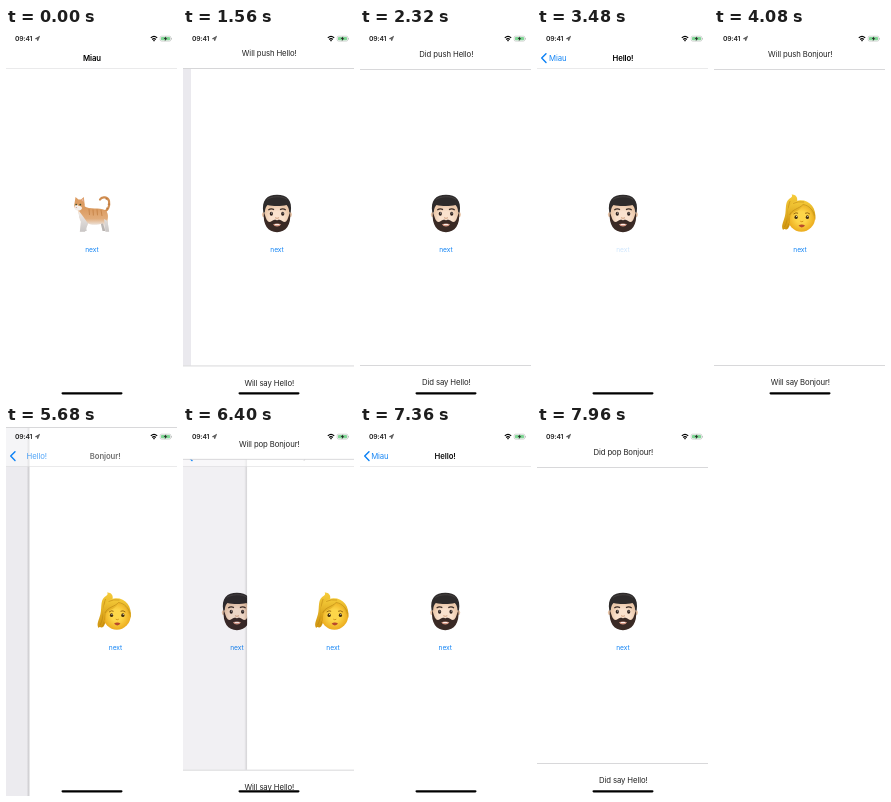
Write an HTML page that moves like this. It is 171 px wide and 370 px high and loops after 8 s.

```html
<!DOCTYPE html>
<html lang="en">
<head>
<meta charset="utf-8">
<title>Navigation events</title>
<style>
  html, body { margin: 0; width: 100%; height: 100%; overflow: hidden; background: #fff; }
  svg { display: block; width: 100%; height: 100%; }
  text { font: 400 7.75px Inter, "Liberation Sans", sans-serif; letter-spacing: -.013em; fill: #222; }
  .mid { text-anchor: middle; }
  .title { font-weight: 600; fill: #000; }
  .blue { fill: #1485f5; }
  .next { font-size: 6.7px; }
  .clock { font-size: 6.75px; font-weight: 600; letter-spacing: -.025em; }
</style>
</head>
<body>
<svg viewBox="0 0 171 370" preserveAspectRatio="none">
  <defs>
    <linearGradient id="edge"><stop offset="0" stop-opacity="0"/><stop offset="1" stop-opacity=".2"/></linearGradient>
    <linearGradient id="fur" x2="0" y2="1"><stop offset="0" stop-color="#d9975a"/><stop offset=".5" stop-color="#e2ac7a"/><stop offset=".75" stop-color="#ece4de"/></linearGradient>
    <linearGradient id="leg" x2="0" y2="1"><stop offset="0" stop-color="#f1ece8"/><stop offset="1" stop-color="#c9c6c5"/></linearGradient>
    <radialGradient id="skin"><stop offset=".5" stop-color="#fae2ce"/><stop offset="1" stop-color="#ecc9ab"/></radialGradient>
    <radialGradient id="gold"><stop offset=".4" stop-color="#fdd649"/><stop offset="1" stop-color="#ecac1e"/></radialGradient>
    <linearGradient id="hair" x2="0" y2="1"><stop offset="0" stop-color="#f6cc3a"/><stop offset="1" stop-color="#cf9410"/></linearGradient>

    <g id="cat">
      <path d="M97 184C102 183 104 178 103 173C102 169 96 168 94 171.500" fill="none" stroke="#d08d50" stroke-width="2.200" stroke-linecap="round"/>
      <path d="M102 181l-2-1.200M104 176l-2.300.300M101 170l-1 2" stroke="#a9652f" stroke-width=".7"/>
      <path d="M79 191L80.500 203H77L75.500 191ZM99 190L99.500 203H96.500L94 192Z" fill="#b9b4b1"/>
      <path d="M78 178C84 182 93 179 99 182C103 185 102 190 101.500 193L103 203.500H99.500L97 195.500C90 197.500 85 197 82 195.500L79 203.500H74L75 193C73 188 72 184 73 180Z" fill="url(#fur)"/>
      <path d="M73 183C76 187 79 191 82 195.500L79 203.800H73.800L75 194C73 190 72.500 187 73 183ZM98 191L101.500 193L103.200 203.800H99.500Z" fill="url(#leg)"/>
      <path d="M83 181l.500 6M87 181.500l.400 6M91 181.300l.500 6M95 182l1 6" stroke="#bb7638" stroke-width=".9" opacity=".7"/>
      <path d="M69.500 169L72.500 171.500H75L77.800 169L78.500 175C80 180 76 183 72.500 182.500C69 181.500 67.500 179 68.500 175.500Z" fill="#dc9c62"/>
      <path d="M71 176.500C68 178 67.600 180.500 70 182C73 183.500 76 182 76 180C75 177 73 179 71 176.500Z" fill="#f4efeb"/>
      <path d="M75.500 172L77.200 170.300L77.500 174Z" fill="#e9b6a3"/>
      <circle cx="70.200" cy="176.600" r=".8" fill="#3b4a2b"/><circle cx="74.300" cy="176.600" r=".9" fill="#3b4a2b"/>
      <path d="M69.500 179.200h1.700l-.900.900Z" fill="#bb6a5f"/>
    </g>

    <g id="man">
      <ellipse cx="72.600" cy="186.500" rx="1.700" ry="2.600" fill="#e9c5a8"/><ellipse cx="99.200" cy="186.500" rx="1.700" ry="2.600" fill="#e9c5a8"/>
      <path d="M73.500 177H98.400V190C98.400 198 93 203 86 203S73.500 198 73.500 190Z" fill="url(#skin)"/>
      <path d="M72.800 184C74.300 187 74.600 191 77 193.500C79.500 195 81 192 83.500 191.700C85 191.500 85.500 192 86 192.300C86.500 192 87 191.500 88.500 191.700C91 192 92.500 195 95 193.500C97.300 191 97.600 187 99.100 184C100.300 197 95 204.200 86 204.200S71.600 197 72.800 184Z" fill="#3a2a25"/>
      <path d="M72.300 184.500C70.300 172 76 166.700 86 166.700S101.600 172 99.700 184.500L98.200 184.500C98 180.500 97 178.500 95.500 177C90 178.300 82 178.300 76.500 177C75 178.500 74 180.500 73.800 184.500Z" fill="#2e2b2b"/>
      <path d="M76 171.500C80 168.300 91 167.300 96 171.500" stroke="#5a5552" stroke-width="1" fill="none" opacity=".5"/>
      <path d="M77.300 182Q80 180 83 181.600M89 181.600Q92 180 94.700 182" fill="none" stroke="#3a2b24" stroke-width="1.200"/>
      <ellipse cx="80.300" cy="185.800" rx="1.600" ry="2" fill="#2d211d"/><ellipse cx="91.700" cy="185.800" rx="1.600" ry="2" fill="#2d211d"/>
      <circle cx="80.600" cy="185" r=".5" fill="#fff"/><circle cx="92" cy="185" r=".5" fill="#fff"/>
      <path d="M84 189.700Q86 191 88 189.700" fill="none" stroke="#cf9b79" stroke-width=".9"/>
      <path d="M82 196.200Q86 194.800 90 196.200Q89 198.600 86 198.600T82 196.200Z" fill="#d99a86"/>
      <path d="M83.500 196H88.500L87.800 197H84.200Z" fill="#fbeee8"/>
    </g>

    <g id="woman">
      <path d="M83 173C84 169 81 166 77.500 166.500C79 168.500 77 169.500 75 171C70 175 73 184 70 191C68.500 196 67 198.500 69 202C71 199.500 71 203 74 200.500C77 197 78 186 79 178Z" fill="url(#hair)"/>
      <path d="M76 173C73 180 75 191 70.500 199M78.500 175C75 184 77 193 73 200" fill="none" stroke="#b67d0d" stroke-width=".7" opacity=".7"/>
      <ellipse cx="87.300" cy="189.500" rx="13.800" ry="14.300" fill="url(#gold)"/>
      <path d="M73.500 190C72 180 77 172.500 86 172.300C96 172 102.500 180 101.300 192C99.500 189 99 185 95 181C91 178 90 177.500 89 176.500C87 183 80 183 77 186.500C75.500 188.500 76 193 75.500 196C74.500 194 73.800 192 73.500 190Z" fill="url(#hair)"/>
      <path d="M89 176.500C85 181 78 181 75.500 187M89 176.500C95 177.500 99 182 100.500 187.500M79 175.500Q84 173 90 174" fill="none" stroke="#b98211" stroke-width=".7" opacity=".8"/>
      <path d="M79.500 186Q82 184 84 185.300M91 185.300Q93.500 184 95.800 186" fill="none" stroke="#9a6a10" stroke-width="1"/>
      <ellipse cx="82" cy="189.200" rx="1.600" ry="1.900" fill="#46300f"/><ellipse cx="93.300" cy="189.200" rx="1.600" ry="1.900" fill="#46300f"/>
      <circle cx="82.400" cy="188.400" r=".5" fill="#fff"/><circle cx="93.700" cy="188.400" r=".5" fill="#fff"/>
      <path d="M86.200 193.200Q87.700 194.300 89.200 193.200" fill="none" stroke="#c98712" stroke-width=".8"/>
      <path d="M84.500 197.600Q87.700 195.600 90.900 197.600Q89.800 199.400 87.700 199.400T84.500 197.600Z" fill="#b8492c"/>
    </g>
  </defs>

  <rect width="171" height="370" fill="#fff"/>
  <g id="pages"></g>
  <rect width="171" height="40.300" fill="#fff" opacity=".5"/>
  <rect y="40" width="171" height=".6" fill="#dcdcde"/>
  <g id="bar"></g>
  <path id="chevron" d="M9 25.700L4.700 30.100L9 34.500" fill="none" stroke="#0a80f5" stroke-width="1.400" stroke-linecap="round" stroke-linejoin="round"/>
  <g id="notes"></g>

  <text class="clock" x="9" y="13.200">09:41</text>
  <path d="M29.400 10.700L33.600 8.300L31.700 12.800L31.400 10.900Z" fill="#777" stroke="#333" stroke-width=".6"/>
  <path d="M144.800 9.900Q148 7 151.200 9.900M146.200 11.500Q148 9.900 149.800 11.500" fill="none" stroke="#000" stroke-width="1.200"/>
  <circle cx="148" cy="12.600" r=".8"/>
  <rect x="154.200" y="8.200" width="10.600" height="4.900" rx="1.400" fill="#fff" stroke="#a5aaa6" stroke-width=".5"/>
  <rect x="155" y="9" width="9" height="3.300" rx=".7" fill="#7fd694"/>
  <path d="M160.200 8.200L157.700 11H159.200L158.700 13.200L161.300 10.200H159.700Z" fill="#222"/>
  <rect x="165.300" y="9.900" width=".7" height="1.600" rx=".3" fill="#a5aaa6"/>
  <rect x="55.500" y="364.200" width="61" height="2.200" rx="1.100"/>
</svg>

<script>
  const LOOP = 8000, W = 171, PARALLAX = 51.3;
  const $ = id => document.getElementById(id);
  const clamp = v => Math.max(0, Math.min(1, v));

  // Critically damped spring from 0 to 1, starting at ms = 0.
  const spring = (ms, rate) => ms <= 0 ? 0 : 1 - (1 + rate * ms) * Math.exp(-rate * ms);
  const pageSpring = ms => spring(ms, .022);
  const noteSpring = ms => spring(ms, .026);

  function add(parent, html) {
    parent.insertAdjacentHTML('beforeend', html);
    return parent.lastElementChild;
  }
  const place = (el, x, y = 0) => el.setAttribute('transform', `translate(${x.toFixed(3)} ${y.toFixed(3)})`);
  const show = (el, on) => el.style.display = on ? '' : 'none';

  // Each screen: title, drawing, and when its link is pressed and released.
  const screens = [
    ['Miau', 'cat', 1140, 1342],
    ['Hello!', 'man', 3460, 3622],
    ['Bonjour!', 'woman', 0, 0],
  ].map(([name, art, press, release]) => {
    const page = add($('pages'), `<g>
      <rect class="edge" x="-3" width="3" height="370" fill="url(#edge)"/>
      <rect width="171" height="370" fill="#fff"/>
      <use href="#${art}"/>
      <text class="mid blue next" x="85.900" y="223.600">next</text>
      <rect class="dim" width="171" height="370" fill="#231c48"/></g>`);
    return {
      page, press, release,
      edge: page.querySelector('.edge'),
      link: page.querySelector('.next'),
      dim: page.querySelector('.dim'),
      title: add($('bar'), `<text class="mid title" x="86" y="32.800">${name}</text>`),
      back: add($('bar'), `<text class="blue" x="12" y="32.800">${name}</text>`),
    };
  });

  // Each note: slide in, slide out, removal, top text, bottom text.
  const notes = [
    [1330, LOOP, 2200, 'Will push Hello!', 'Will say Hello!'],
    [1830, 2455, 2900, 'Did push Hello!', 'Did say Hello!'],
    [3612, LOOP, 4480, 'Will push Bonjour!', 'Will say Bonjour!'],
    [4110, 4778, 5200, 'Did push Bonjour!', 'Did say Bonjour!'],
    [5667, 6370, 6800, 'Will pop Bonjour!', 'Will say Hello!'],
    [7440, LOOP, LOOP, 'Did pop Bonjour!', 'Did say Hello!'],
  ].map(([start, leave, end, head, foot]) => ({
    start, leave, end,
    top: add($('notes'), `<g><rect y="-20" width="171" height="61.500" fill="#fff"/>
      <rect y="41" width="171" height=".7" fill="#c8c8cb"/>
      <text class="mid" x="86.300" y="29">${head}</text></g>`),
    bottom: add($('notes'), `<g><rect y="337" width="171" height="60" fill="#fff"/>
      <rect y="337" width="171" height=".7" fill="#c8c8cb"/>
      <text class="mid" x="86.300" y="357.100">${foot}</text></g>`),
  }));

  // Swipe back: the finger drags the page, rests, then lets go.
  function popped(t) {
    if (t < 5665) return 0;
    const u = clamp((t - 5665) / 255);
    return .105 + .27 * (1 - (1 - u) ** 2) + .625 * pageSpring(t - 7100);
  }

  function draw(t) {
    const depth = pageSpring(t - 1342) + pageSpring(t - 3622) - popped(t);

    screens.forEach((s, i) => {
      const o = i - depth;
      show(s.page, Math.abs(o) < .999);
      place(s.page, o > 0 ? W * o : PARALLAX * o);
      s.dim.style.opacity = .1 * clamp(-o);
      s.edge.style.opacity = t > 5600 ? clamp(1 - o) : 0;
      s.link.style.opacity = t >= s.press && t < s.release ? .2 : 1;

      s.title.style.opacity = clamp(1 - Math.abs(o)) ** 4;
      place(s.title, o * (o > 0 ? 96 : 64));
      s.back.style.opacity = (o > -1 ? clamp(-o) : clamp(2 + o)) ** 2;
      place(s.back, 62 * (o + 1));
    });
    $('chevron').style.opacity = clamp(depth);

    for (const n of notes) {
      const on = t >= n.start && t < n.end;
      show(n.top, on);
      show(n.bottom, on);
      const hidden = 1 - noteSpring(t - n.start) + noteSpring(t - n.leave);
      place(n.top, 0, -42 * hidden);
      place(n.bottom, 0, 35 * hidden);
    }
  }

  const began = performance.now();
  function tick() {
    draw((performance.now() - began) % LOOP);
    requestAnimationFrame(tick);
  }
  tick();
</script>
</body>
</html>
```
